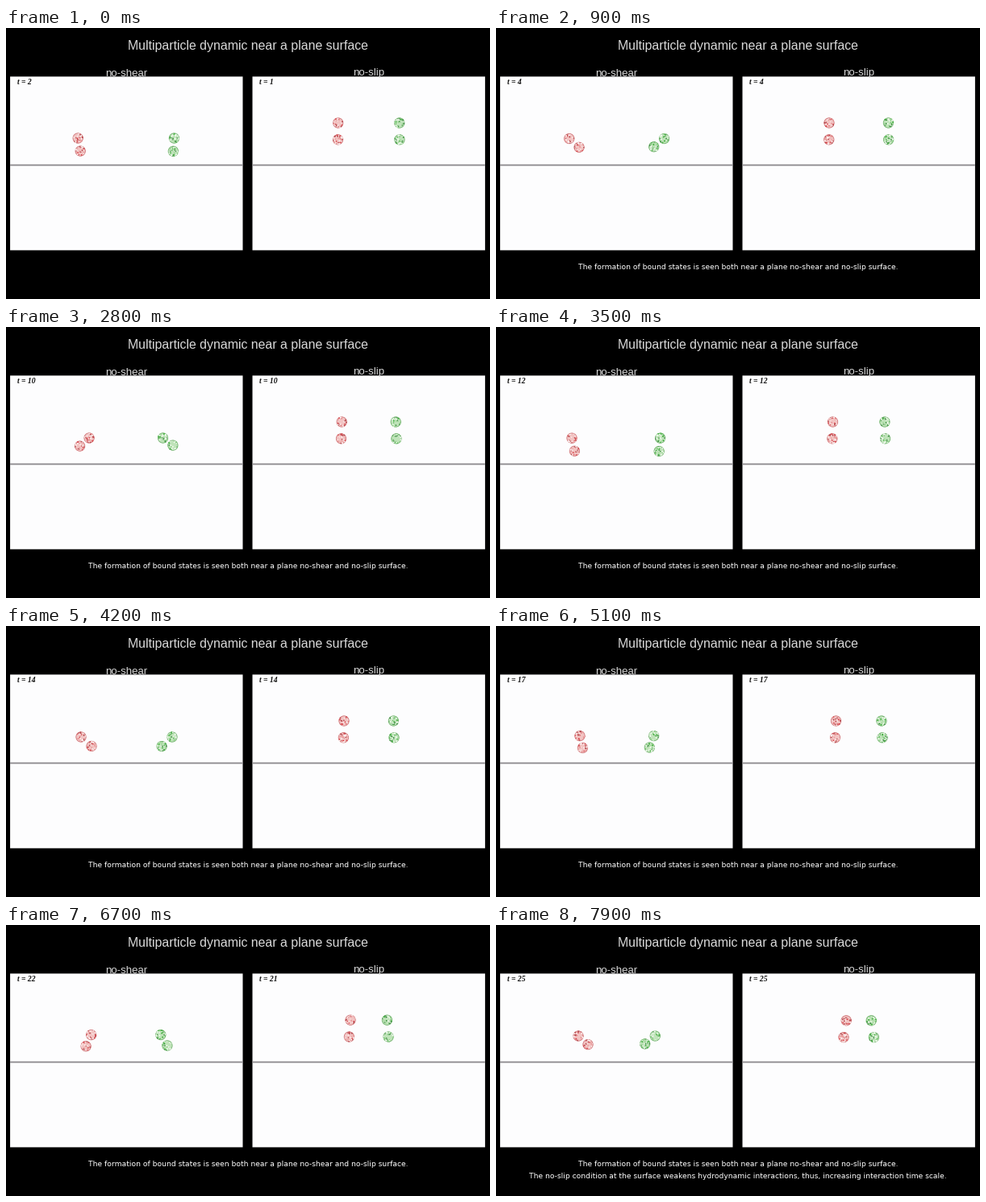
These frames come from a looping animation (600 px wide and 337 px high, 8 s). A matplotlib script:

```python
import numpy as np
import matplotlib.pyplot as plt
from matplotlib.animation import FuncAnimation
from matplotlib.patches import Circle, Rectangle

W, H, DPI = 600, 337, 100
FRAMES, STEP = 80, 100
PX = 72 / DPI
RADIUS, DOTS = 6.2, 64
rng = np.random.default_rng(4)

fig = plt.figure(figsize=(W / DPI, H / DPI), dpi=DPI, facecolor="black")
ax = fig.add_axes([0, 0, 1, 1])
ax.set_xlim(0, W)
ax.set_ylim(H, 0)
ax.axis("off")


def label(x, y, text, size, font, color="white", **kw):
    kw = {"ha": "center", **kw}
    return ax.text(x, y, text, fontsize=size * PX, family=font, color=color,
                   va="baseline", **kw)


def panel(x, title, cx):
    label(cx, 59.5, title, 13.3, "Liberation Sans", "#d8d8d8")
    ax.add_patch(Rectangle((x, 60.4), 288.4, 216, fc="#fdfdfe", lw=0, snap=False))
    ax.add_patch(Rectangle((x, 169.6), 288.4, 1.8, fc="#8b898c", lw=0, snap=False))
    return label(x + 8.9, 70, "", 9.7, "Liberation Serif", "#101010",
                 ha="left", style="italic", weight="bold")


class Ball:
    """Speckled sphere turning about the vertical axis."""

    def __init__(self, rim, body, shades, spin):
        self.disc = ax.add_patch(Circle((0, 0), RADIUS, fc=body, ec=rim,
                                        lw=0.8 * PX, zorder=3))
        v = rng.normal(size=(DOTS, 3))
        self.pts = v / np.linalg.norm(v, axis=1)[:, None]
        self.dots = ax.scatter(*np.zeros((2, DOTS)), lw=0, zorder=4,
                               s=(rng.uniform(1.1, 2.1, DOTS) * PX) ** 2,
                               c=rng.choice(shades, DOTS))
        self.spin = spin

    def place(self, x, y, t):
        self.disc.center = x, y
        a = self.spin * t
        px, py, pz = self.pts.T
        qx = px * np.cos(a) + pz * np.sin(a)
        qz = pz * np.cos(a) - px * np.sin(a)
        xy = np.column_stack([x + qx * RADIUS * 0.92, y + py * RADIUS * 0.92])
        xy[qz < 0] = np.nan
        self.dots.set_offsets(xy)


KEYS = np.array([0, 1.9, 2.8, 4.2, 5.1, 6.7, 7.9])


def smooth(values):
    """Cubic Hermite curve through values at KEYS."""
    v = np.array(values, float)
    slope = np.gradient(v, KEYS)

    def curve(t):
        i = min(np.searchsorted(KEYS, t, side="right") - 1, len(KEYS) - 2)
        h = KEYS[i + 1] - KEYS[i]
        u = (t - KEYS[i]) / h
        return ((1 + 2 * u) * (1 - u) ** 2 * v[i] + u * (1 - u) ** 2 * h * slope[i]
                + u * u * (3 - 2 * u) * v[i + 1] + u * u * (u - 1) * h * slope[i + 1])
    return curve


# Bound pair over the no-shear wall: a swinging dumbbell with slow drift
phase = smooth([-7.62, -4.14, -2.66, 0, 1.30, 4.19, 6.68])
drift = smooth([94.0, 97.6, 98.9, 99.5, 102.4, 105.3, 106.7])
top_y = smooth([137, 138, 138, 138, 136.6, 136.6, 138])
length = smooth([16.3, 16.1, 15.3, 17.3, 15.4, 15.6, 16])

# Pairs over the no-slip wall: slow approach
high_x = smooth([411.7, 414.5, 416.2, 419, 421.5, 427, 434.2])
low_x = smooth([411.5, 414.2, 415.5, 418.4, 420.5, 425.4, 431])
sink = smooth([0, 0, 0, 0, 0, 0.2, 0.8])


def free_pair(t, lag):
    p = phase(t) - lag
    dx = -13 * np.cos(p)
    mid = drift(t) + 3.4 * np.sin(p)
    y = top_y(t)
    return (mid + dx / 2, y), (mid - dx / 2, y + np.sqrt(length(t) ** 2 - dx ** 2))


def stuck_pair(t, lag):
    d = sink(t)
    return (high_x(t), 118 + d), (low_x(t), 138.8 + d)


RED = ("#cf7276", "#f2c4c3", ["#d8444a", "#e99a9a", "#fdf1f0", "#fdf1f0", "#b5484d"])
GREEN = ("#6fb06b", "#bfe3b9", ["#46b043", "#93d28c", "#f1fbee", "#f1fbee", "#468f4a"])
GREEN_LAG = 0.15

label(300, 27.3, "Multiparticle dynamic near a plane surface", 15.9,
      "Liberation Sans", "#d8d8d8")
clock_l = panel(5.1, "no-shear", 149.2)
clock_r = panel(305.5, "no-slip", 449.5)
notes = [
    (label(300, 300.3, "The formation of bound states is seen both near a plane "
           "no-shear and no-slip surface.", 9.18, "DejaVu Sans"), 0.3),
    (label(300, 315.3, "The no-slip condition at the surface weakens hydrodynamic "
           "interactions, thus, increasing interaction time scale.", 9.18,
           "DejaVu Sans"), 6.8),
]

# (pair function, mirror sum, red balls, green balls)
groups = [
    (pair, mirror, [Ball(*RED, s) for s in (2.1, -1.7)],
     [Ball(*GREEN, s) for s in (-2.1, 1.7)])
    for pair, mirror in ((free_pair, 298.5), (stuck_pair, 899.4))
]


def draw(i):
    t = i * STEP / 1000
    clock_l.set_text(f"t = {int(2 + 3 * t + 1e-6)}")
    clock_r.set_text(f"t = {int(1.75 + 3 * t + 1e-6)}")
    for note, start in notes:
        note.set_alpha(float(np.clip((t - start) / 0.4, 0, 1)))
    for pair, mirror, reds, greens in groups:
        for ball, (x, y) in zip(reds, pair(t, 0)):
            ball.place(x, y, t)
        for ball, (x, y) in zip(greens, pair(t, GREEN_LAG)):
            ball.place(mirror - x, y, t)
    return []


anim = FuncAnimation(fig, draw, frames=FRAMES, interval=STEP, repeat=True,
                     repeat_delay=0, blit=False)
plt.show()
```
